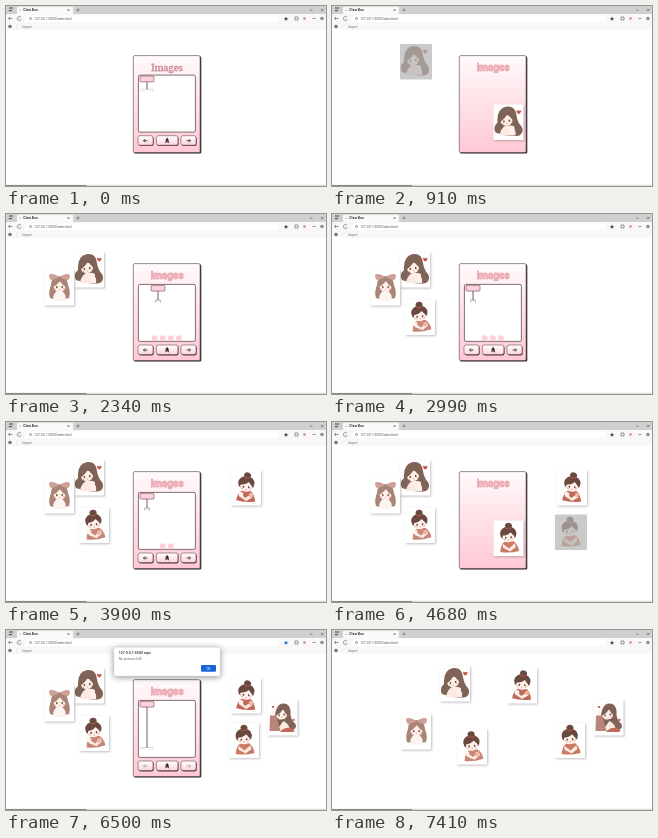
Recreate the animation shown at these times as an HTML page. Size 320 by 180 pixels, loop 7.54 s.

```html
<!DOCTYPE html>
<html lang="en">
<head>
<meta charset="utf-8">
<title>Claw machine</title>
<style>
html, body { margin: 0; width: 100%; height: 100%; overflow: hidden; background: #fff; }
svg { display: block; width: 100vw; height: 100vh; }
text { font-family: Roboto, "Liberation Sans", sans-serif; }
.card { filter: drop-shadow(1px 1px 1px rgba(0,0,0,.25)); }
.title { font-size: 10px; font-weight: 700; text-anchor: middle; fill: #f9b5c0; stroke: #f0a5b2; stroke-width: .3px; filter: drop-shadow(.5px .6px .2px #bd8791); }
.title.plain { font: 11px "Liberation Serif", serif; fill: #f6b3bf; stroke: #c98a96; }
.line { fill: none; stroke: #555; stroke-width: .6; }
</style>
</head>
<body>
<svg viewBox="0 0 320 180">
  <defs>
    <linearGradient id="pink" x2="0" y2="1"><stop offset="0" stop-color="#fffafb"/><stop offset="1" stop-color="#ffc8d4"/></linearGradient>
    <linearGradient id="key" x2="0" y2="1"><stop offset="0" stop-color="#fff"/><stop offset="1" stop-color="#ffd5de"/></linearGradient>
    <path id="heart" d="M0 2.2C-4 -.6-1.6-3.2 0-1C1.6-3.2 4-.6 0 2.2Z" fill="#c9544c"/>
    <g id="face">
      <ellipse rx="6" ry="5.2" fill="#fff0e9"/>
      <g fill="#5a3d35"><ellipse cx="-2.7" cy=".5" rx=".8" ry="1"/><ellipse cx="2.7" cy=".5" rx=".8" ry="1"/></g>
      <g fill="#f8c0b6"><ellipse cx="-3.9" cy="2.3" rx="1.2" ry=".7"/><ellipse cx="3.9" cy="2.3" rx="1.2" ry=".7"/></g>
      <path d="M-.7 2.8Q0 3.4.7 2.8" fill="none" stroke="#b5645e" stroke-width=".5"/>
    </g>
    <rect id="paper" width="30" height="35.5" fill="#fff"/>
  </defs>

  <rect width="320" height="180" fill="#fff"/>
  <g id="browser">
    <rect width="320" height="8" fill="#cfd0d1"/>
    <path d="M11 8V2Q11 .8 12.5.8H65.5Q67 .8 67 2V8Z" fill="#fafafa"/>
    <rect y="8" width="320" height="16" fill="#f8f8f8"/>
    <rect x="20" y="9.3" width="253" height="6.6" rx="2" fill="#fff"/>
    <path d="M3 2h4M3 4.6h3" stroke="#444" stroke-width="1"/>
    <circle cx="14.2" cy="4.2" r=".8" fill="#bbb"/>
    <text x="17.3" y="5.4" font-size="3.5" font-weight="700" fill="#333">Claw Box</text>
    <path class="line" d="M61.5 3l2 2m0-2l-2 2M70.5 4h3m-1.5-1.5v3M304 4h2.5M315 2.8l2.4 2.4m0-2.4l-2.4 2.4" stroke-width=".4"/>
    <path class="line" d="M6.5 12.5h-4l1.5-1.5m-1.5 1.5l1.5 1.5M15 11.3a2 2 0 1 0 .3 1.9"/>
    <circle cx="24.5" cy="12.5" r="1" class="line" stroke-width=".4"/>
    <text x="28.5" y="13.8" font-size="3.2" fill="#555">127.0.0.1:5500/index.html</text>
    <path id="star" d="M280 10.6l.7 1.3 1.5.2-1.1 1 .3 1.5-1.4-.7-1.4.7.3-1.5-1.1-1 1.5-.2z" fill="#555"/>
    <path class="line" d="M289 11h3v3h-3zM306.5 12.5h3"/>
    <circle cx="298.5" cy="12.5" r="1.4" fill="#d99a8a"/>
    <circle cx="316" cy="12.5" r="1.8" fill="#8f8a9b"/>
    <circle cx="4" cy="20.5" r="1.8" fill="#777"/>
    <path d="M10.5 18.5v4" stroke="#ddd" stroke-width=".5"/>
    <text x="16" y="21.8" font-size="3.3" fill="#7a6a6a">Import</text>
    <path d="M0 179.3H320" stroke="#d0d0d0" stroke-width="1"/>
    <path d="M0 179.5H80" stroke="#888" stroke-width="1"/>
  </g>

  <g id="machine">
    <rect x="128" y="50.3" width="67.3" height="97.2" rx="1.5" fill="#2b2426"/>
    <rect x="127.3" y="49.6" width="66.8" height="97" rx="1.5" fill="url(#pink)" stroke="#4d4245" stroke-width=".6"/>
    <text class="title" id="title" x="161" y="65.3">Images</text>
    <g id="inside">
      <rect x="132.4" y="70.4" width="57" height="57" rx="1.5" fill="#fff" stroke="#44383b" stroke-width=".7"/>
      <g id="balls"></g>
      <g id="claw">
        <path id="rope" stroke="#6f6068" stroke-width="1"/>
        <rect x="-7" y="71.3" width="14" height="5.8" rx="1" fill="#ffd0d9" stroke="#6d474f" stroke-width=".6"/>
        <g id="hook">
          <path id="prongs" fill="none" stroke="#9a8e91" stroke-width=".8"/>
          <circle id="prize" cy="4.3" r="3" fill="#f6ced6" stroke="#b59aa1" stroke-width=".4"/>
        </g>
      </g>
      <g id="keys"></g>
    </g>
  </g>

  <g id="cards"></g>

  <g id="alert">
    <rect x="108" y="17.3" width="106" height="28.7" rx="2" fill="#fff" stroke="#ddd" stroke-width=".4" style="filter:drop-shadow(0 1px 3px rgba(0,0,0,.45))"/>
    <text x="112.7" y="23.6" font-size="3.5" font-weight="700" fill="#444">127.0.0.1:5500 says</text>
    <text x="112.7" y="30.2" font-size="3.3" fill="#666">No pictures left!</text>
    <rect x="195" y="35" width="15" height="6.8" rx="1" fill="#1765d8"/>
    <text x="202.5" y="39.6" font-size="3.2" fill="#fff" text-anchor="middle">OK</text>
  </g>
</svg>
<script>
const STEP = 130, LOOP = 7540, REST = 9, DEEP = 42;
const $ = id => document.getElementById(id);
const show = (el, on) => el.setAttribute('display', on ? 'inline' : 'none');
const place = (el, x, y) => el.setAttribute('transform', `translate(${x} ${y})`);
const use = (id, x, y, s = 1) => `<use href="#${id}" transform="translate(${x} ${y}) scale(${s})"/>`;
const shape = (d, fill) => `<path d="${d}" fill="${fill}"/>`;

const DARK = '#6a493f', BROWN = '#806357', LIGHT = '#a88577';
const RED = '#c0685a', CREAM = '#f8ebe0', SKIN = '#fff0e9';

function bunGirl(dress, tilt, sweet) {
  return `<g transform="rotate(${tilt} 15 18)">` +
    shape('M6 31Q7 23 11 21H20Q24 24 25 31Q15 33 6 31Z', dress) +
    shape('M9 23L15 28L21 23L22 27L16 31L9 27Z', CREAM) +
    shape('M12 5Q13 1.5 17 2.5Q20.5 4 18.5 7.5H13Z', DARK) +
    `<ellipse cx="15" cy="13" rx="8.2" ry="7" fill="${DARK}"/>` +
    use('face', 15, 16.5) +
    shape('M7.6 17Q8 8 15 8Q22 8 22.4 17Q19.5 15 17.5 11.8Q14 15 9.5 14.8Z', DARK) +
    `<path d="M12.5 7.6Q16 9 19 7.2" stroke="#b85650" stroke-width=".9" fill="none"/></g>` +
    (sweet ? `<circle cx="10" cy="24.5" r="2.4" fill="${SKIN}"/><circle cx="20" cy="25" r="2.2" fill="#eeb99c"/>` : '');
}

const art = [
  shape('M2 28Q-1 22 4 18Q3 4 13 2Q22 1 23 11Q24 18 28 22Q31 28 26 31Q16 33 2 28Z', BROWN) +
    shape('M6 31Q7 24 12 21H18Q23 25 22 31Z', '#fbeae4') +
    `<g transform="rotate(-10 13 16)">${use('face', 13, 16)}</g>` +
    shape('M6 18Q5 8 13 6Q20 7 20 16Q16 13 14 9Q12 14 6 18Z', BROWN) +
    shape('M17 30Q15 25 18 21L21 22Q20 26 21 30Z', SKIN) + use('heart', 25.3, 7.5),
  shape('M6 28Q4 22 7 15Q7 6 15.5 6Q24 7 24 15Q27 23 25 28Q15 31 6 28Z', LIGHT) +
    shape('M9 31Q9 23 13 21H18Q22 23 22 31Z', '#fbf3ef') + use('face', 15.5, 16.5) +
    shape('M9 17Q8 8 15.5 8Q23 8 22 17Q18 15 16 11Q13 15 9 17Z', LIGHT) +
    shape('M15.5 7Q8 2 5 5Q5 10 8 10Q12 9 15.5 7Q19 9 23 10Q26 10 26 5Q23 2 15.5 7Z', '#cfa096'),
  bunGirl('#c98577', -7, true),
  bunGirl(RED, 4, true),
  bunGirl('#cb7a64', -3, false),
  shape('M10 25Q6 15 9 9Q12 2 19 4Q24 7 23 15Q24 21 28 24Q30 29 24 30Q17 31 10 25Z', BROWN) +
    shape('M11 31Q12 25 16 21Q21 23 23 31Z', CREAM) + shape('M2 31L2.5 16Q5 13 9 17L13 31Z', '#b98578') +
    shape('M13 31Q20 25 27 30L26 32H13Z', RED) + shape('M4 16L4.5 11L6 10L7.5 15Z', SKIN) +
    `<g transform="rotate(-10 14 14)">${use('face', 14, 14.5, .95)}</g>` +
    shape('M8 16Q8 6 15 6Q21 7 20.5 16Q17 13 15.5 9Q13 14 8 16Z', BROWN) +
    use('heart', 5.5, 7, .6) + use('heart', 26, 20, .6)
];

// pop: card appears, drop: it lands at (x, y); next: later move [time, x, y]
const cards = [
  { pop: 650, drop: 1040, x: 68, y: 38, next: [6890, 108, 36] },
  { pop: 1820, drop: 2210, x: 38, y: 56, next: [7150, 69, 84] },
  { pop: 2600, drop: 2990, x: 73, y: 85.5, next: [7280, 125, 99] },
  { pop: 3510, drop: 3900, x: 225, y: 48, next: [7020, 175, 38] },
  { pop: 4420, drop: 4810, x: 223, y: 92.5 },
  { pop: 5460, drop: 6110, x: 261.5, y: 70 }
];

// claw steps: time, x, rope length
const steps = [
  [0, 141, REST], [260, 141, REST], [390, 148, REST], [520, 148, DEEP],
  [1040, 141, REST], [1300, 160.5, REST], [1430, 160.5, REST], [1560, 160.5, DEEP], [1690, 160.5, 20],
  [2210, 141, REST], [2340, 152, REST], [2470, 152, DEEP],
  [2990, 141, REST], [3120, 152, REST], [3250, 161, DEEP], [3380, 161, REST],
  [3900, 141, REST], [4030, 156, REST], [4160, 156, DEEP], [4290, 156, REST],
  [4810, 141, REST], [5070, 161, REST], [5200, 161, DEEP], [5330, 161, REST],
  [6110, 141, REST], [6240, 141, 20], [6370, 141, DEEP]
];

const group = (parent, html) => {
  const g = document.createElementNS('http://www.w3.org/2000/svg', 'g');
  g.innerHTML = html;
  return parent.appendChild(g);
};

cards.forEach((c, i) => {
  c.el = group($('cards'), use('paper', 0, 0) + art[i]);
  c.el.setAttribute('class', 'card');
});
cards.forEach((c, i) => {
  c.ghost = group($('cards'), `<g opacity=".8">${art[i]}</g><rect width="32" height="35.5" fill="#aaa" opacity=".62"/>`);
});
const balls = cards.map(() => group($('balls'), '<circle r="3" fill="#ffd0d9"/>'));

const keys = [[132, 15], [150.4, 21.5], [175, 15]].map(([x, w], i) => {
  const mid = x + w / 2, dir = i - 1;
  const icon = dir
    ? `<path d="M${mid - 2 * dir} 136H${mid + 2 * dir}m${-1.6 * dir} -1.6l${1.6 * dir} 1.6l${-1.6 * dir} 1.6" fill="none" stroke="#222" stroke-width=".8"/>`
    : `<circle cx="${mid}" cy="135.3" r="1.5" fill="#333"/><path d="M${mid - 1.6} 138.3l.8-2.6M${mid + 1.6} 138.3l-.8-2.6M${mid} 133v5" stroke="#333" stroke-width=".9"/>`;
  return group($('keys'),
    `<rect x="${x + .6}" y="131.7" width="${w}" height="9.7" rx="2" fill="#4a363b"/>` +
    `<rect x="${x}" y="131" width="${w}" height="9.5" rx="2" fill="url(#key)" stroke="#6d5057" stroke-width=".6"/><g>${icon}</g>`).lastChild;
});

function drag(c, t, end, len, from, to) {
  const p = Math.min(1, (t - (end - STEP - len)) / len);
  if (t >= end || p <= 0) return false;
  place(c.ghost, from[0] + (to[0] - from[0]) * p, from[1] + (to[1] - from[1]) * p);
  return true;
}

function drawCard(c, t) {
  const popAt = [161.5, 98.5], home = [c.x, c.y];
  let at = t < c.drop ? popAt : home;
  let ghost = t >= c.pop && drag(c, t, c.drop, 2 * STEP, popAt, home);
  if (c.next) {
    const [end, ...goal] = c.next;
    if (t >= end) at = goal;
    ghost = drag(c, t, end, STEP, home, goal) || ghost;
  }
  show(c.el, t >= c.pop);
  place(c.el, ...at);
  show(c.ghost, ghost);
}

function draw(t) {
  const popped = cards.some(c => t >= c.pop && t < c.drop);
  const [, x, len] = steps.findLast(s => s[0] <= t);
  const caught = steps.filter(s => s[2] === DEEP && s[0] <= t && s[0] < 6000).length;
  const done = cards.filter(c => t >= c.pop).length;
  const first = t < STEP, empty = first || t >= 6110;

  show($('machine'), t < 6760);
  show($('inside'), !popped);
  place($('inside'), 0, first ? -1.3 : 0);
  $('title').setAttribute('class', first ? 'title plain' : 'title');

  place($('claw'), x, 0);
  place($('hook'), 0, 76 + len);
  $('rope').setAttribute('d', `M0 77V${76 + len}`);
  $('prongs').setAttribute('d', empty ? 'M-6 2V-.5H6V2M-3 .5V2M3 .5V2' : 'M-2.5 3.5Q-3 .5 0 0Q3 .5 2.5 3.5M0 0V2.5');
  $('prongs').setAttribute('opacity', empty ? .4 : 1);
  show($('prize'), caught > done);

  const left = cards.length - caught;
  balls.forEach((b, i) => {
    show(b, !first && i < left);
    place(b, 160.8 + (i - (left - 1) / 2) * 8.1, 124.2);
  });
  [0, 2].forEach(i => keys[i].setAttribute('opacity', len > REST ? .35 : 1));

  cards.forEach(c => drawCard(c, t));
  const asking = t >= 6500 && t < 6630;
  show($('alert'), asking);
  $('star').setAttribute('fill', asking ? '#3478cf' : '#555');
}

const start = performance.now();
function tick() {
  const t = (performance.now() - start) % LOOP;
  draw(Math.floor(t / STEP) * STEP);
  requestAnimationFrame(tick);
}
tick();
</script>
</body>
</html>
```
